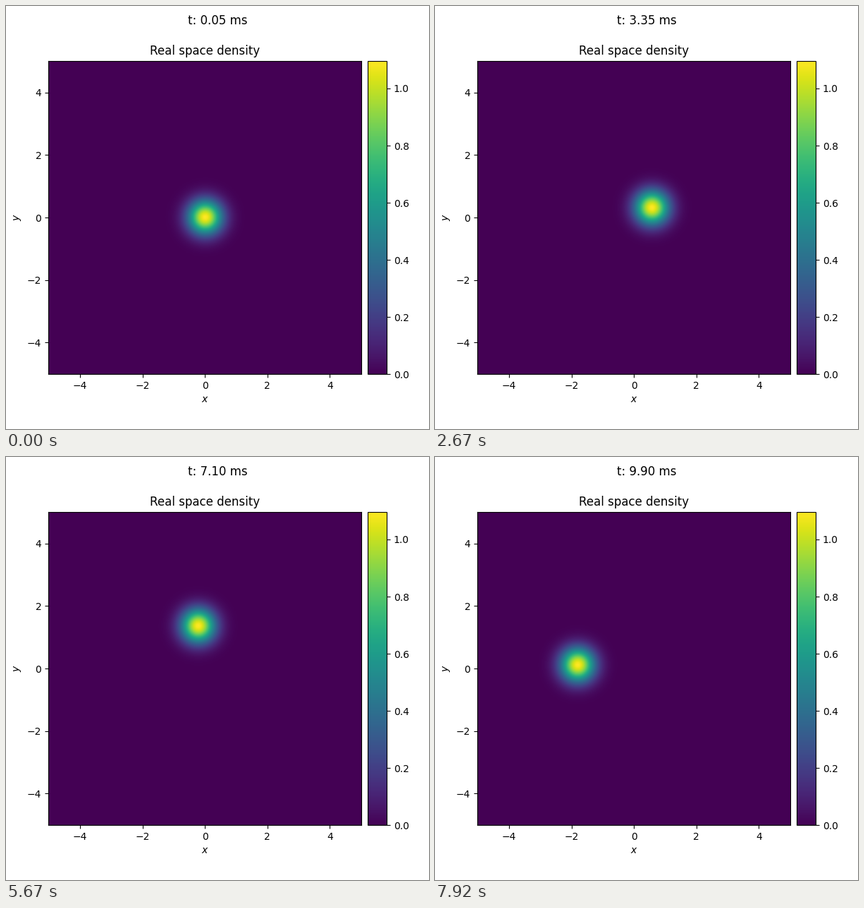
A matplotlib script for the animation above (8 s loop, 600 by 600 pixels).

```python
import numpy as np
import matplotlib.pyplot as plt
from matplotlib.animation import FuncAnimation
from mpl_toolkits.axes_grid1 import make_axes_locatable

LOOP_MS = 8000
TICKS = 160             # redraws per loop
STEPS = 96              # visible changes per loop
TICK_MS = LOOP_MS / TICKS
STEP_MS = LOOP_MS / STEPS

HALF, CELLS = 5.0, 256
PEAK = 1.09672
OMEGA = 2 * np.pi * 0.4  # trap frequency, rad/ms

grid = np.linspace(-HALF, HALF, CELLS)
edge = HALF + HALF / (CELLS - 1)


def centre(t):
    """Outward spiral plus the cloud's own swing in the trap."""
    radius = t * (0.222 - 0.0038 * t)
    angle = np.radians(t ** 2 * (2.56 - 0.0765 * t))
    swing = 0.18 / OMEGA * np.sin(OMEGA * t)
    return radius * np.cos(angle) - swing, radius * np.sin(angle)


def density(t):
    """Gaussian of unit norm around the centre."""
    gx, gy = (np.exp(-np.pi * PEAK * (grid - c) ** 2) for c in centre(t))
    return PEAK * np.outer(gy, gx)


def clock(tick):
    """Simulation time in ms, held between steps."""
    step = int((tick * TICK_MS + 44) / STEP_MS)
    return 0.05 * (1 + step * 25 // 12)


fig, ax = plt.subplots(figsize=(6, 6), dpi=100)
fig.subplots_adjust(left=0.1, right=0.9, bottom=0.1, top=0.9)
image = ax.imshow(density(0), origin="lower", cmap="viridis",
                  extent=(-edge, edge, -edge, edge), vmin=0, vmax=PEAK)
ax.set(title="Real space density", xlabel="$x$", ylabel="$y$",
       xticks=range(-4, 5, 2), yticks=range(-4, 5, 2))
cax = make_axes_locatable(ax).append_axes("right", size="6%", pad="2%")
fig.colorbar(image, cax=cax)
heading = fig.suptitle("")


def draw(tick):
    t = clock(tick)
    image.set_data(density(t))
    heading.set_text(f"t: {t:.2f} ms")
    return image, heading


anim = FuncAnimation(fig, draw, frames=TICKS, interval=TICK_MS,
                     repeat=True, repeat_delay=0)
plt.show()
```
